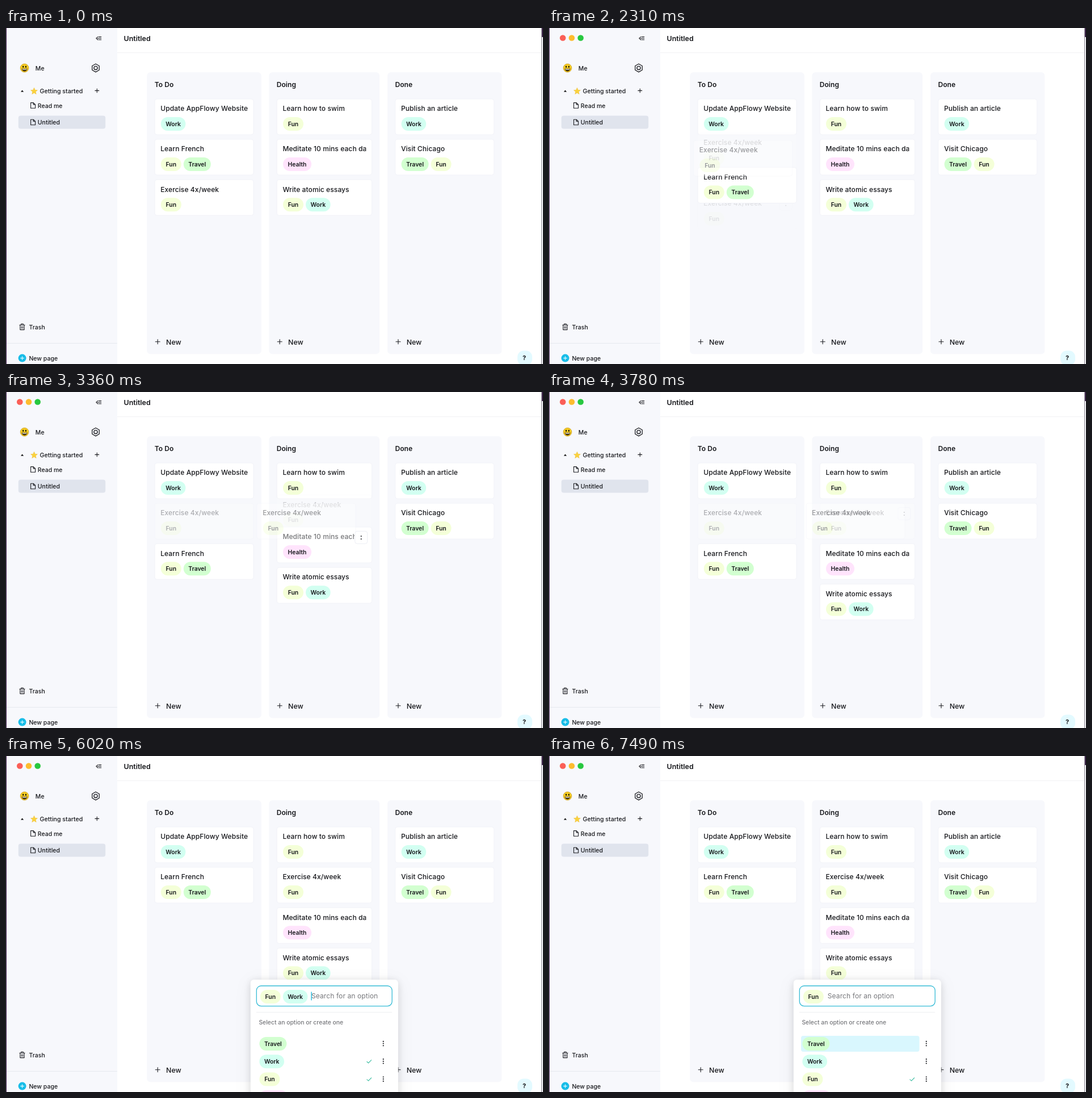
An HTML page for the animation above (8 s loop, 946 by 592 pixels).

```html
<!DOCTYPE html>
<html lang="en">
<head>
<meta charset="utf-8">
<title>Board</title>
<style>
  html, body { margin: 0; width: 100%; height: 100%; overflow: hidden; background: #fff; }
  #stage { display: block; width: 100vw; height: 100vh; }
  text { font-family: Inter, "Open Sans", sans-serif; font-weight: 500; fill: #16171b; white-space: pre; }
  .line { fill: none; stroke: #1c1d22; stroke-width: 1.1; stroke-linecap: round; stroke-linejoin: round; }
  .popover { fill: #fff; filter: drop-shadow(0 2px 7px rgba(0, 0, 0, .13)) drop-shadow(0 5px 14px rgba(0, 0, 0, .06)); }
</style>
</head>
<body>
<svg id="stage" viewBox="0 0 946 592"></svg>
<script>
const LOOP = 8000, STEP = 70;
const SLOT = [125, 196, 267.2, 338.3], PITCH = 71.2;
const PANEL = '#f7f8fc';

const TAGS = {
  Fun: { w: 36, fill: '#f4ffd8' },
  Work: { w: 43.6, fill: '#d2fff1' },
  Travel: { w: 48, fill: '#d2ffd0' },
  Health: { w: 50, fill: '#ffe4fc' }
};
const CARDS = {
  update: ['Update AppFlowy Website', 'Work'],
  french: ['Learn French', 'Fun', 'Travel'],
  exercise: ['Exercise 4x/week', 'Fun'],
  swim: ['Learn how to swim', 'Fun'],
  meditate: ['Meditate 10 mins each day', 'Health'],
  essays: ['Write atomic essays', 'Fun', 'Work'],
  publish: ['Publish an article', 'Work'],
  chicago: ['Visit Chicago', 'Travel', 'Fun']
};
const COLUMNS = [
  { title: 'To Do', x: 248.3, w: 201.5, cardX: 262, cardW: 174 },
  { title: 'Doing', x: 463.3, w: 194.7, cardX: 477.2, cardW: 167.3 },
  { title: 'Done', x: 672, w: 201.3, cardX: 685.7, cardW: 174 }
];

const clamp = v => Math.min(1, Math.max(0, v));
const part = (t, from, to) => clamp((t - from) / (to - from));
const smooth = (t, from, to) => { const p = part(t, from, to); return p * p * (3 - 2 * p); };
const easeOut = (t, from, to) => 1 - (1 - part(t, from, to)) ** 3;
const within = (t, from, to) => t >= from && t < to;

// Text is placed by its left edge and the middle of its capitals.
const text = (s, x, cy, size = 10.5, attrs = '') =>
  `<text x="${x}" y="${cy + size * .36}" font-size="${size}" ${attrs}>${s}</text>`;
const big = (s, x, cy, attrs = '') => text(s, x, cy, 12, 'letter-spacing=".1" ' + attrs);
const rect = (x, y, w, h, r, fill, attrs = '') =>
  `<rect x="${x}" y="${y}" width="${w}" height="${h}" rx="${r}" fill="${fill}" ${attrs}/>`;
const circle = (x, y, r, fill, attrs = '') => `<circle cx="${x}" cy="${y}" r="${r}" fill="${fill}" ${attrs}/>`;
const line = (d, attrs = '') => `<path class="line" d="${d}" ${attrs}/>`;
const plus = (x, y, r, attrs = '') => line(`M${x - r} ${y}h${2 * r}M${x} ${y - r}v${2 * r}`, attrs);

const tag = (name, x, cy) => {
  const { w, fill } = TAGS[name];
  return rect(x, cy - 12, w, 24, 12, fill) +
    text(name, x + w / 2, cy, 10.4, 'text-anchor="middle" style="font-weight:600"');
};
const tagRow = (names, x, cy) => names.map(name => {
  const mark = tag(name, x, cy);
  x += TAGS[name].w + 4;
  return mark;
}).join('');

const dots = (x, cy, gap, r) => [-1, 0, 1].map(i => circle(x, cy + i * gap, r, '#1c1d22')).join('');
const menuButton = (x, cy) =>
  rect(x - 11, cy - 11, 22, 22, 4, '#fff', 'stroke="#eceef4" stroke-width="1"') +
  circle(x, cy - 2.2, 1, '#1c1d22') + circle(x, cy + 2.6, 1, '#1c1d22');

function card(id, col, y, { x = COLUMNS[col].cardX, alpha = 1, menu = false, tags } = {}) {
  const w = COLUMNS[col].cardW, [title, ...own] = CARDS[id];
  return `<g transform="translate(${x} ${y})" opacity="${alpha}">` +
    rect(0, 0, w, 63, 4, '#fff', 'stroke="#eff0f6" stroke-width=".8"') +
    `<svg x="10" y="4" width="${w - 20}" height="27">${big(title, .2, 13)}</svg>` +
    tagRow(tags || own, 10.8, 44) +
    (menu ? menuButton(w - 18.8, 18.3) : '') + '</g>';
}

function sidebar(t) {
  const file = y => line(`M43.6 ${y - 4.8}h4.6l3.4 3.3v6.3h-8zM48.2 ${y - 4.8}v3.3h3.4`);
  const star = Array.from({ length: 10 }, (_, i) => {
    const r = i % 2 ? 2.8 : 6.2, a = i * Math.PI / 5;
    return `${49.5 + r * Math.sin(a)},${111.5 - r * Math.cos(a)}`;
  }).join(' ');
  const hexagon = Array.from({ length: 6 }, (_, i) => {
    const a = i * Math.PI / 3;
    return `${158 + 7.2 * Math.sin(a)} ${70.4 - 7.2 * Math.cos(a)}`;
  }).join('L');
  const lights = ['#fb5f57', '#fdbc2e', '#28c840'].map((c, i) => circle(24.3 + 15.7 * i, 17.5, 5.3, c)).join('');

  return rect(0, 0, 196, 592, 0, PANEL) + rect(0, 0, 1, 592, 0, '#452052') +
    (t >= 70 ? lights : '') +
    line('M162 15.4l-3.2 2.8l3.2 2.8M163.5 15.6h4.2M161.2 18.2h6.5M163.5 20.8h4.2') +
    circle(32.6, 70.5, 7.4, '#f7cb23', 'stroke="#b58a16" stroke-width=".6"') +
    `<ellipse cx="30.2" cy="68.3" rx="1" ry="1.8"/><ellipse cx="35" cy="68.3" rx="1" ry="1.8"/>
     <path d="M27.6 71.6h10a5 4.8 0 0 1-10 0z" fill="#40300c"/><path d="M28.7 72.2h7.8v1.2h-7.8z" fill="#fff"/>` +
    text('Me', 51.8, 70.9) +
    line(`M${hexagon}Z`, 'style="stroke-width:1.3"') + circle(158, 70.4, 3.1, 'none', 'stroke="#1c1d22" stroke-width="1.3"') +
    '<path d="M26 112.4l2.6-3l2.6 3z"/>' +
    `<polygon points="${star}" fill="#fbd33b" stroke="#e9b52c" stroke-width=".5"/>` +
    text('Getting started', 59.6, 110.9, 10.6) + plus(160.3, 110.4, 3.4) +
    file(136.4) + text('Read me', 55.8, 136.9) +
    rect(21.8, 154.4, 153.4, 23, 4, '#e0e4ed') + file(166) + text('Untitled', 55.8, 166.4) +
    line('M23.9 523.2h9.2M26.7 523v-1.8h3.6v1.8M24.9 523.4v8.2h7.2v-8.2M27.3 525.8v3.4M29.7 525.8v3.4') +
    text('Trash', 40.6, 526.9) +
    rect(1, 555, 195, 1, 0, '#e6e9ef') +
    circle(28.6, 581.6, 7, '#18bde8') + plus(28.6, 581.6, 2.9, 'style="stroke:#e6faff"') +
    text('New page', 40.4, 582);
}

function frame() {
  return text('Untitled', 207.6, 19, 12.4, 'style="font-weight:600"') +
    rect(196, 43, 747, 1, 0, '#f1f1f4') +
    rect(943, 0, 1.2, 592, 0, '#8d8a94') + rect(944.2, 0, 1.8, 592, 0, '#ededf1') +
    rect(944.2, 0, 1.8, 16, 0, '#2c1238') +
    COLUMNS.map(({ title, x, w }) =>
      rect(x, 78, w, 496.5, 6, PANEL) + big(title, x + 13.4, 100, 'style="font-weight:600"') +
      plus(x + 18.9, 552.8, 4) + text('New', x + 33.8, 553.8, 12.3)).join('');
}

function todoCards(t) {
  const swap = smooth(t, 2120, 2420);
  const dragging = within(t, 2030, 2590);
  const away = within(t, 3220, 4060);
  let out = card('update', 0, SLOT[0]);
  if (t < 2030) {
    out += card('french', 0, SLOT[1]) + card('exercise', 0, SLOT[2], { menu: t >= 1050 });
  } else if (dragging) {
    // The faded stand-in closes in the lower slot while it opens in the upper one.
    out += card('exercise', 0, SLOT[2] + PITCH * swap / 2, { alpha: .35 * (1 - swap), menu: true }) +
      card('exercise', 0, SLOT[1] - PITCH * (1 - swap) / 2, { alpha: .35 * swap }) +
      card('french', 0, SLOT[1] + PITCH * swap);
  } else if (t < 4060) {
    out += card('exercise', 0, SLOT[1], { alpha: away ? .33 : 1, menu: !away }) + card('french', 0, SLOT[2]);
  } else {
    out += card('french', 0, SLOT[2] - PITCH * smooth(t, 3990, 4200));
  }
  return out;
}

function doingCards(t) {
  const open = smooth(t, 3220, 3470);
  const dropped = t >= 4060;
  let out = card('swim', 1, SLOT[0]);
  if (open > 0) {
    out += card('exercise', 1, SLOT[1] - PITCH * (1 - open) / 2,
      { alpha: dropped ? 1 : .33 * open, menu: within(t, 3710, 4060) });
  }
  return out +
    card('meditate', 1, SLOT[1] + PITCH * open, { menu: within(t, 3290, 3500) }) +
    card('essays', 1, SLOT[2] + PITCH * open,
      { menu: within(t, 4410, 6020), tags: t >= 7280 ? ['Fun'] : ['Fun', 'Work'] });
}

function draggedCard(t) {
  if (within(t, 2030, 2590)) {
    return card('exercise', 0, 247.5 - 53 * easeOut(t, 2030, 2500), { x: 254.6, alpha: .42 });
  }
  if (within(t, 3220, 4060)) {
    const x = 262 + 185 * easeOut(t, 3150, 3450) + 8 * smooth(t, 3640, 3850);
    return card('exercise', 0, SLOT[1], { x, alpha: .42 });
  }
  return '';
}

function popover(t) {
  if (t < 6020) return '';
  const chosen = t >= 7280 ? ['Fun'] : ['Fun', 'Work'];
  const hovered = within(t, 6370, 6650) || t >= 7490 ? 0 : within(t, 6720, 7350) ? 1 : -1;
  const promptX = chosen.length > 1 ? 538 : 490.8;
  const rows = ['Travel', 'Work', 'Fun', 'Health'].map((name, i) => {
    const y = 507 + 31.3 * i;
    return (i === hovered ? rect(444, y - 14, 208.5, 28, 4, '#d9f7fe') : '') + tag(name, 446.4, y) +
      (chosen.includes(name) ? line(`M635.8 ${y + .2}l2.6 2.5l5.2-5.3`, 'style="stroke:#45bfa5"') : '') +
      dots(664.7, y - .4, 3.7, 1.1);
  }).join('');
  return '<rect class="popover" x="430.8" y="394" width="260" height="300" rx="6"/>' +
    rect(441.3, 405, 238.8, 35.6, 8, '#fff', 'stroke="#37bcd6" stroke-width="1.3"') +
    tagRow(chosen, 447.8, 424) +
    big('Search for an option', promptX, 423, 'style="fill:#77787c;font-weight:400"') +
    (t < 6370 ? rect(537.4, 415.5, 1.3, 15, 0, '#12b5dc') : '') +
    rect(441, 451, 239, 1, 0, '#eeeff2') +
    text('Select an option or create one', 445.4, 469, 10.4, 'style="fill:#77787c"') + rows;
}

const help = rect(901, 568.5, 26, 26, 11, '#e3faff') +
  text('?', 913.2, 581.4, 11, 'text-anchor="middle" style="font-weight:700"');

function scene(t) {
  return sidebar(t) + frame() + todoCards(t) + doingCards(t) +
    card('publish', 2, SLOT[0]) + card('chicago', 2, SLOT[1]) +
    draggedCard(t) + help + popover(t);
}

const stage = document.getElementById('stage');
const start = performance.now();
let shown = -1;
function tick() {
  const t = Math.floor(((performance.now() - start) % LOOP) / STEP) * STEP;
  if (t !== shown) stage.innerHTML = scene(shown = t);
  requestAnimationFrame(tick);
}
tick();
</script>
</body>
</html>
```
